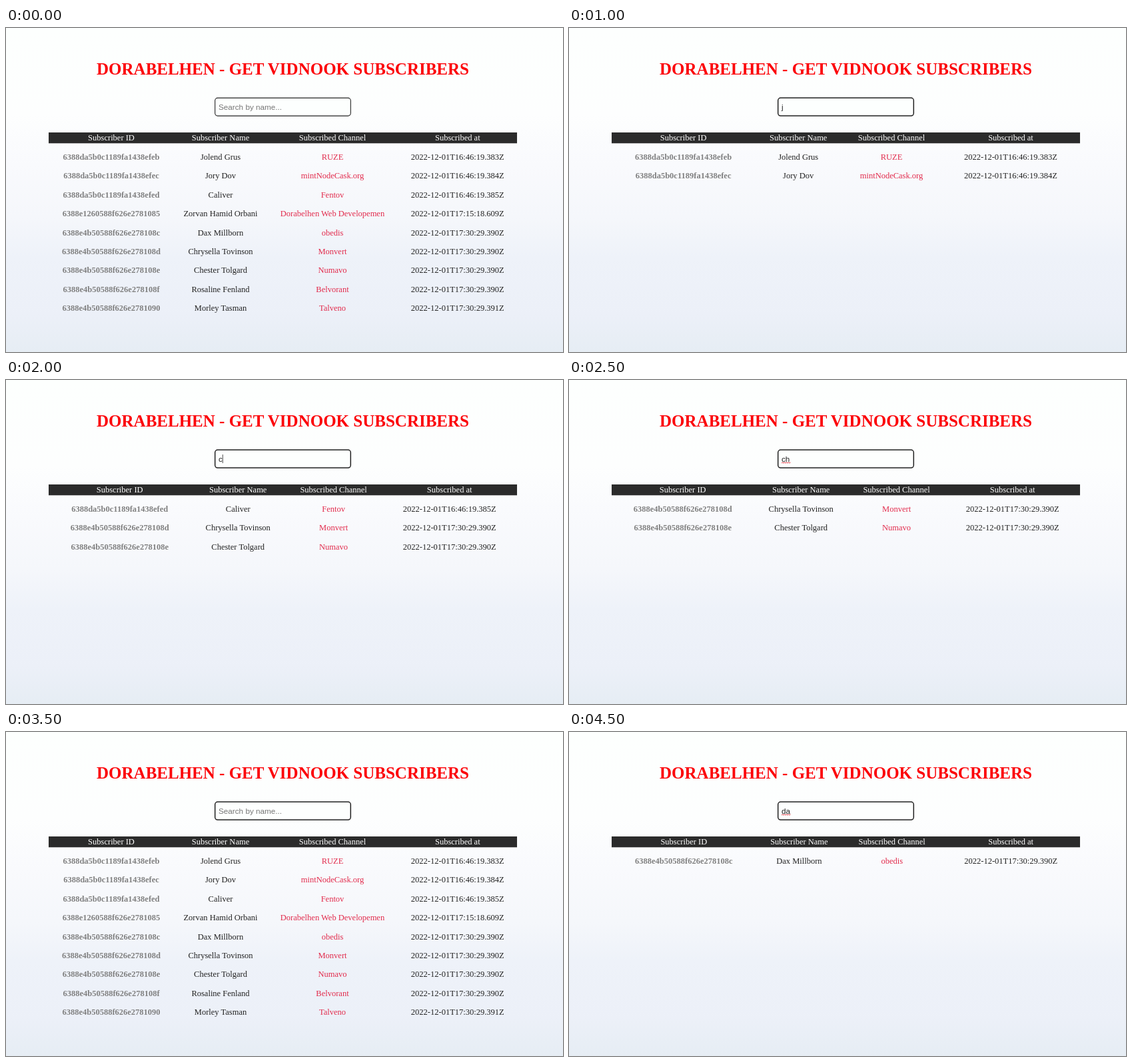
Write an HTML page that moves like this. It is 836 px wide and 487 px high and loops after 5 s.

```html
<!DOCTYPE html>
<html lang="en">
<head>
<meta charset="utf-8">
<title>Subscriber search</title>
<style>
  html, body { margin: 0; width: 100%; height: 100%; overflow: hidden; }
  svg { display: block; width: 836px; height: 487px;
    background: linear-gradient(#fdfffe 0, #fdfefe 130px, #f9fafd 205px, #f5f7fb 285px, #eef2f9 345px, #ecf0f8 430px, #e6edf4 487px); }
  text { font: 12.5px "Liberation Serif", serif; text-anchor: middle; fill: #222; }
  .title { font-size: 25px; font-weight: bold; fill: #fc0208; }
  .head { fill: #fff; }
  .id { font-weight: bold; fill: #808080; }
  .channel { fill: #e22b4c; }
  .query { font: 11.72px "Liberation Sans", sans-serif; text-anchor: start; fill: #222; }
  .placeholder { fill: #757575; }
</style>
</head>
<body>
<svg viewBox="0 0 836 487">
  <text class="title" x="415.5" y="70.3">DORABELHEN - GET VIDNOOK SUBSCRIBERS</text>
  <rect id="box" x="313.7" y="105.1" width="203.6" height="27" rx="4" fill="#fdfffe" stroke="#222"/>
  <text id="query" class="query" x="319" y="122.7"></text>
  <path id="squiggle" fill="none" stroke="#e8404a" stroke-width="1"/>
  <path id="caret" d="M325.3 112V125" stroke="#222" stroke-width="0.8"/>
  <rect x="64" y="157" width="703" height="16.3" fill="#2b2b2b"/>
  <g id="table"></g>
</svg>
<script>
const LOOP = 5000, STEP = 500;
const queries = ['', '', 'j', '', 'c', 'ch', 'chr', '', 'd', 'da'];

const headings = ['Subscriber ID', 'Subscriber Name', 'Subscribed Channel', 'Subscribed at'];
const classes = ['id', 'name', 'channel', 'date'];
const subscribers = [
  ['6388da5b0c1189fa1438efeb', 'Jolend Grus', 'RUZE', '16:46:19.383'],
  ['6388da5b0c1189fa1438efec', 'Jory Dov', 'mintNodeCask.org', '16:46:19.384'],
  ['6388da5b0c1189fa1438efed', 'Caliver', 'Fentov', '16:46:19.385'],
  ['6388e1260588f626e2781085', 'Zorvan Hamid Orbani', 'Dorabelhen Web Developemen', '17:15:18.609'],
  ['6388e4b50588f626e278108c', 'Dax Millborn', 'obedis', '17:30:29.390'],
  ['6388e4b50588f626e278108d', 'Chrysella Tovinson', 'Monvert', '17:30:29.390'],
  ['6388e4b50588f626e278108e', 'Chester Tolgard', 'Numavo', '17:30:29.390'],
  ['6388e4b50588f626e278108f', 'Rosaline Fenland', 'Belvorant', '17:30:29.390'],
  ['6388e4b50588f626e2781090', 'Morley Tasman', 'Talveno', '17:30:29.391'],
].map(([id, name, channel, time]) => [id, name, channel, `2022-12-01T${time}Z`]);

// Column centres depend on the widest cells among the matches.
const wideColumns = [158, 322, 490, 677.8];
const columnsFor = {
  j: [171.6, 344.2, 484, 663],
  c: [170.7, 348.2, 491.6, 665.7],
  ch: [170.7, 348.2, 491.6, 665.7],
  chr: [170.7, 348.2, 491.6, 665.7],
  da: [172.3, 345.4, 484.7, 663.2],
};

const byId = id => document.getElementById(id);
const cells = (row, columns, y, className) => row.map((value, i) =>
  `<text class="${className || classes[i]}" x="${columns[i]}" y="${y}">${value}</text>`).join('');

function wave(from, to) {
  let d = `M${from} 124.9`;
  for (let x = from, up = true; x < to; x += 1.5, up = !up) d += `l1.5 ${up ? -1 : 1}`;
  return d;
}

function draw(step) {
  const query = queries[step];
  const columns = columnsFor[query] || wideColumns;
  const matches = subscribers.filter(row => row[1].toLowerCase().includes(query));
  byId('table').innerHTML = cells(headings, columns, 169, 'head') +
    matches.map((row, i) => cells(row, columns, 197.7 + 28.45 * i)).join('');

  const field = byId('query');
  field.textContent = query || 'Search by name...';
  field.classList.toggle('placeholder', !query);
  byId('box').setAttribute('stroke-width', step ? 1.5 : 1.1);
  byId('caret').style.display = query === 'c' ? '' : 'none';
  byId('squiggle').setAttribute('d',
    query.length > 1 ? wave(319, 319 + field.getComputedTextLength()) : '');
}

let shown = -1;
function tick() {
  const step = Math.floor(performance.now() % LOOP / STEP);
  if (step !== shown) draw(shown = step);
  requestAnimationFrame(tick);
}
tick();
</script>
</body>
</html>
```
